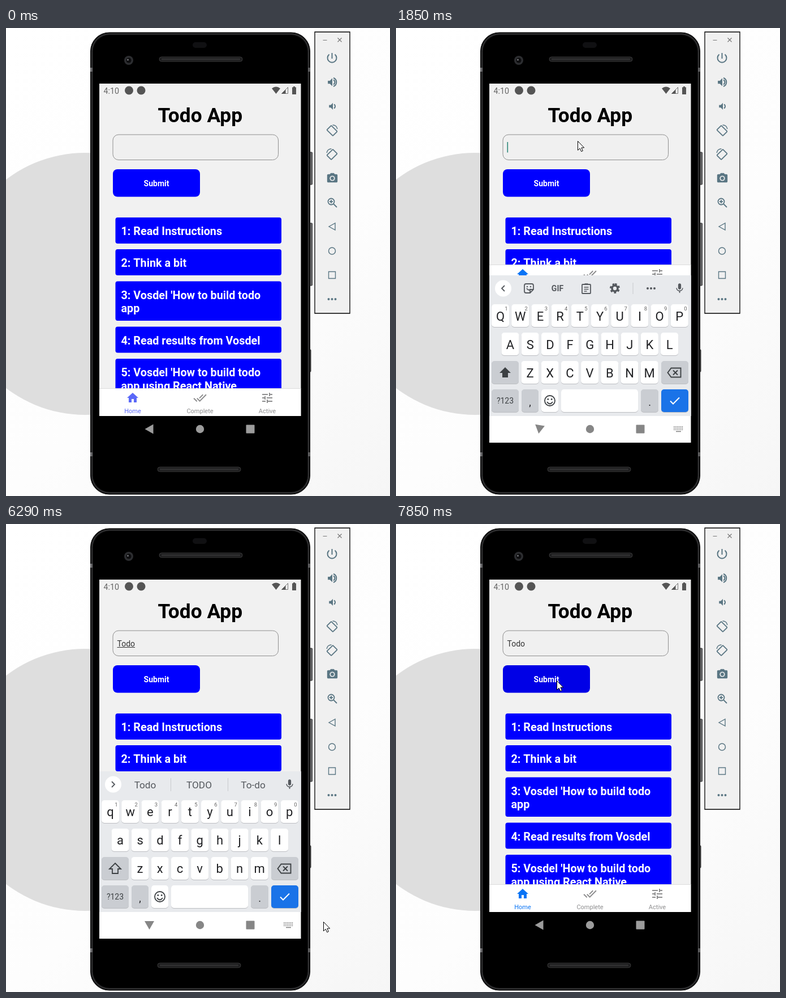
Recreate the animation shown at these times as an HTML page with a canvas. Size 679 by 825 pixels, loop 8 s.

```html
<!DOCTYPE html>
<html lang="en">
<head>
<meta charset="utf-8">
<title>Todo App</title>
<style>
html, body { margin: 0; width: 100%; height: 100%; overflow: hidden; background: #fdfdfd; }
canvas { display: block; }
</style>
</head>
<body>
<canvas id="c" width="679" height="825"></canvas>
<script>
const stage = document.getElementById('c').getContext('2d');
const layer = new OffscreenCanvas(679, 825).getContext('2d');
let g = stage;
const LOOP = 8000, BLUE = '#0000ff', GREY = '#8e8e8f', SLATE = '#5a7683', KEYTXT = '#202124', ICON = '#55595e';

const clamp = v => Math.max(0, Math.min(1, v));

function rect(x, y, w, h, r, fill, stroke, lw = 1) {
  g.beginPath();
  g.roundRect(x, y, w, h, r);
  if (fill) { g.fillStyle = fill; g.fill(); }
  if (stroke) { g.strokeStyle = stroke; g.lineWidth = lw; g.stroke(); }
}
function circle(x, y, r, fill, stroke, lw = 1) {
  rect(x - r, y - r, 2 * r, 2 * r, r, fill, stroke, lw);
}
function text(s, x, y, size, color, align = 'left', weight = 400) {
  g.font = `${weight} ${size}px Roboto, sans-serif`;
  g.textAlign = align;
  g.fillStyle = color;
  g.fillText(s, x, y);
}
// Filled 24-unit icon centred at x, y
function icon(d, x, y, size, color) {
  g.save();
  g.translate(x, y);
  g.scale(size / 24, size / 24);
  g.translate(-12, -12);
  g.fillStyle = color;
  g.fill(new Path2D(d));
  g.restore();
}
// Stroked path relative to x, y
function lines(d, x, y, color, lw = 1.5) {
  g.save();
  g.translate(x, y);
  g.strokeStyle = color;
  g.lineWidth = lw;
  g.stroke(new Path2D(d));
  g.restore();
}
function clipped(x, y, w, h, draw) {
  g.save();
  g.beginPath();
  g.rect(x, y, w, h);
  g.clip();
  draw();
  g.restore();
}

const HOME = 'M10 20v-6h4v6h5v-8h3L12 3 2 12h3v8z';
const DONE = 'M18 7l-1.41-1.41-6.34 6.34 1.41 1.41zM22.24 5.59L11.66 16.17 7.48 12l-1.41 1.41L11.66 19l12-12zM.41 13.41L6 19l1.41-1.41L1.83 12z';
const TUNE = 'M3 17v2h6v-2zM3 5v2h10V5zM13 21v-2h8v-2h-8v-2h-2v6zM7 9v2H3v2h4v2h2V9zM21 13v-2H11v2zM15 9h2V7h4V5h-4V3h-2z';
const SPEAKER = 'M3 9v6h4l5 5V4L7 9z';
const MIC = 'M12 14c1.66 0 3-1.34 3-3V5c0-1.66-1.34-3-3-3S9 3.34 9 5v6c0 1.66 1.34 3 3 3zM17.3 11c0 3-2.54 5.1-5.3 5.1S6.7 14 6.7 11H5c0 3.41 2.72 6.23 6 6.72V21h2v-3.28c3.28-.48 6-3.3 6-6.72z';
const CAMERA = 'M9 2L7.17 4H4c-1.1 0-2 .9-2 2v12c0 1.1.9 2 2 2h16c1.1 0 2-.9 2-2V6c0-1.1-.9-2-2-2h-3.17L15 2z';

function dots(x, y, color) {
  for (const d of [-6, 0, 6]) circle(x + d, y, 2, color);
}

function backdrop() {
  const bg = g.createLinearGradient(0, 0, 679, 825);
  bg.addColorStop(0, '#ffffff');
  bg.addColorStop(.6, '#fdfdfd');
  bg.addColorStop(1, '#f6f6f6');
  g.fillStyle = bg;
  g.fillRect(0, 0, 679, 825);
  circle(140, 451, 231, '#dedede');
}

function phone() {
  for (const [y, h] of [[219, 57], [344, 110], [567, 39]]) rect(536, y, y < 500 ? 5.5 : 3, h, 1, '#6a6a6c', '#2a2a2b');
  rect(149.5, 8, 388, 814, 33, '#141415', '#050505');
  rect(152, 10.5, 383, 809, 31, null, '#48484a');
  rect(154, 12.5, 379, 805, 29, '#000');
  g.fillStyle = '#6a6a6c';
  for (const y of [70, 748]) { g.fillRect(149, y, 4, 7); g.fillRect(534.5, y, 3, 7); }
  rect(330, 25, 25, 10, 5, '#101012');
  circle(217, 57, 8, '#2c2d30');
  circle(217, 57, 4.5, '#0c0c0e');
  circle(215.5, 56, 1.5, '#77787c');
  for (const [x, y] of [[271, 51], [268, 774]]) {
    rect(x, y, 147, 8, 4, '#1b1b1c', '#3a3a3b');
    lines('M4 0H143', x, y + 4, '#303031', 3);
  }
}

function panel() {
  rect(546, 7, 62, 496, 0, '#f0f0f0', '#000', 1.3);
  lines('M-3.5 0H3.5', 564, 21.5, '#777', 1);
  lines('M-3.5-3.5L3.5 3.5M3.5-3.5L-3.5 3.5', 590, 21, '#777', 1.2);
  const x = 577;
  lines('M0-9V1M-5-6.5A8 8 0 1 0 5-6.5', x - .5, 53, SLATE, 2);
  icon(SPEAKER, x, 95.5, 21, SLATE);
  lines('M2-4A4.5 4.5 0 0 1 2 4M2-7.5A8 8 0 0 1 2 7.5', x, 95.5, SLATE, 2);
  icon(SPEAKER, x + 1, 138, 18, SLATE);
  lines('M3-3.5A4 4 0 0 1 3 3.5', x, 138, SLATE, 2);
  for (const [y, s] of [[181, 1], [223, -1]]) {
    g.save();
    g.translate(x - .5, y);
    g.scale(s, 1);
    lines('M1-10Q8-10 9.5-3', 0, 0, SLATE, 1.4);
    g.rotate(-Math.PI / 4);
    rect(-5.5, -7.5, 11, 15, 1, null, SLATE, 1.8);
    g.restore();
  }
  icon(CAMERA, x, 265, 22, SLATE);
  circle(x, 265, 4.6, '#f0f0f0');
  circle(x, 265, 2.9, SLATE);
  circle(x - 2, 306, 5.5, null, SLATE, 1.8);
  lines('M2 2L8 8M-5-2H1M-2-5V1', x, 308, SLATE, 1.8);
  lines('M-6 0L5-6V6Z', x, 350, SLATE, 1.4);
  circle(x - .5, 393, 6, null, SLATE, 1.5);
  rect(x - 6.5, 429.5, 12, 12, 0, null, SLATE, 1.4);
  dots(x - .5, 478, SLATE);
}

function statusBar() {
  text('4:10', 172.5, 115.5, 14.3, '#666');
  circle(217.5, 110, 7.5, '#555');
  circle(239, 110, 7.5, '#555');
  g.fillStyle = '#555';
  g.fill(new Path2D('M470 106.5Q477.5 100.5 485 106.5L477.5 116ZM506 104.5h2v-1.5h3v1.5h2V117h-7z'));
  lines('M487.5 115.5H498.5V104.5Z', 0, 0, '#777', 1);
  g.fill(new Path2D('M487 116L494.5 108.5V116Z'));
}

const ITEMS = [
  [334, 46, '1: Read Instructions'],
  [390, 46, '2: Think a bit'],
  [446.5, 69.5, "3: Vosdel 'How to build todo", 'app'],
  [526.5, 46, '4: Read results from Vosdel'],
  [583, 70, "5: Vosdel 'How to build todo", 'app using React Native']
];

function tabs(y, homeColor) {
  g.fillStyle = '#fff';
  g.fillRect(165, y, 356.5, 49);
  g.fillStyle = '#dcdcdc';
  g.fillRect(165, y, 356.5, 1);
  [[HOME, 'Home'], [DONE, 'Complete'], [TUNE, 'Active']].forEach(([d, label], i) => {
    const color = i ? GREY : homeColor, x = 224 + 119 * i;
    icon(d, x, y + 17, 24, color);
    text(label, x, y + 44, 11, color, 'center');
  });
}

// Typed text by time: [time, text, underlined letters]
const TYPING = [
  [0, '', 0], [2550, 't', 0], [2780, 'to', 1], [2930, 'tod', 2], [3160, 'todo', 3], [3330, 'todo', 4],
  [3720, 'tod', 3], [3870, 'to', 2], [4030, 't', 1], [4100, '', 0],
  [4640, 'T', 0], [4810, 'To', 1], [4880, 'Tod', 2], [5130, 'Todo', 3], [5360, 'Todo', 4], [7070, 'Todo', 0]
];
const HINTS = [
  [0, null], [2780, 't to the'], [2930, 'to today tomorrow'], [3160, 'tod today toddler'], [3330, 'todo Todo to-do'],
  [3720, 'tod today toddler'], [3870, 'to today tomorrow'], [4030, 't to the'], [4180, null],
  [4810, 'T The To'], [4880, 'To Today Tomorrow'], [5130, 'Tod Today Toddler'], [5360, 'Todo TODO To-do'], [7070, '']
];
const CARET = [[0, 0], [1380, 1], [2000, 0], [2550, 1], [3570, 0], [3720, 1], [5830, 0], [6360, 1], [6840, 0]];
const at = (list, t) => list.findLast(k => k[0] <= t);

function field(t) {
  rect(189, 188, 292.5, 44.5, 10, '#f0f0f0', '#8f8f8f');
  const [, word, under] = at(TYPING, t);
  text(word, 196.5, 215.5, 14, '#333');
  g.fillStyle = '#333';
  if (under) g.fillRect(196.5, 217, g.measureText(word.slice(0, under)).width, 1);
  if (at(CARET, t)[1]) {
    const x = 196.5 + g.measureText(word).width;
    g.fillStyle = '#2a8578';
    g.fillRect(x, 201, 1.6, 18.5);
  }
}

function app(t) {
  const small = t >= 1850 && t < 7400;
  const tabY = !small ? 635 : t < 1925 ? 417 : 436;
  g.fillStyle = '#f1f1f1';
  g.fillRect(165, 98, 356.5, 586);
  statusBar();
  text('Todo App', 343.3, 166, 35.3, '#000', 'center', 700);
  field(t);
  const press = clamp((t - 7100) / 500);
  rect(189, 249, 154, 48.5, 8, `rgb(0 0 ${255 - 25 * press})`);
  text('Submit', 266, 279, 14, '#fff', 'center', 700);
  clipped(165, 320, 356.5, tabY - 320, () => {
    for (const [y, h, ...rows] of ITEMS) {
      rect(193.5, y, 293.5, h, 4, BLUE);
      rows.forEach((row, i) => text(row, 203.5, y + 31 + 23.5 * i, 19.8, '#fff', 'left', 700));
    }
  });
  if (small) {
    g.fillStyle = '#fff';
    g.fillRect(165, 436, 356.5, 248);
  }
  if (!small || tabY < 436) clipped(165, tabY, 356.5, small ? 19 : 49, () => tabs(tabY, t < 1700 ? '#5a68f8' : '#0a74f5'));
}

function key(x, y, w, fill = '#fff') {
  rect(x, y + 1, w, 40, 5, '#bcbec2');
  rect(x, y, w, 40, 5, fill);
}

function toolbar(hint) {
  const y = 459;
  circle(189.5, y, 14.5, '#fff');
  lines(hint === null ? 'M2.5-5L-2.5 0L2.5 5' : 'M-2.5-5L2.5 0L-2.5 5', 189.5, y, ICON, 1.8);
  icon(MIC, 501.5, y, 21, ICON);
  if (hint) {
    hint.split(' ').forEach((s, i) => text(s, 246 + 95.5 * i, 466, 17.2, ICON, 'center'));
    g.fillStyle = '#c8cacd';
    g.fillRect(291, 448, 1, 23);
    g.fillRect(392, 448, 1, 23);
  }
  if (hint !== null) return;
  lines('M-5-8H5Q8-8 8-5V2L2 8H-5Q-8 8-8 5V-5Q-8-8-5-8ZM8 2H2V8M-4 0Q0 5 3 1', 235, y, ICON, 1.8);
  circle(232, 456, 1.2, ICON);
  circle(238, 456, 1.2, ICON);
  text('GIF', 285.5, 464, 14, ICON, 'center', 700);
  rect(329, 452, 15, 16, 1, null, ICON, 1.8);
  lines('M-3-8H3M-4-2H4M-4 1.5H4M-4 5H1', 336.5, y, ICON, 1.7);
  g.setLineDash([3.4, 3.2]);
  circle(387, y, 7, null, ICON, 4);
  g.setLineDash([]);
  circle(387, y, 5, null, ICON, 3.6);
  g.fillStyle = '#c8cacd';
  g.fillRect(418.5, 449, 1, 20);
  dots(451, y, ICON);
}

function keyboard(t) {
  const caps = t < 2550 || (t >= 4100 && t < 4640), gray = '#cacdd2';
  g.fillStyle = '#e8eaed';
  g.fillRect(165, 436, 356.5, 248);
  toolbar(at(HINTS, t)[1]);
  ['qwertyuiop', 'asdfghjkl', 'zxcvbnm'].forEach((row, r) => [...row].forEach((ch, i) => {
    const x = [184.5, 202, 237][r] + 35.2 * i, y = 487 + 50 * r;
    key(x - 15.5, y, 31);
    text(caps ? ch.toUpperCase() : ch, x, y + (caps ? 28.5 : 27.5), 22, KEYTXT, 'center');
    if (!r) text((i + 1) % 10, x + 10.5, y + 11, 9.5, '#666', 'center');
  }));
  key(169, 587, 48, gray);
  const arrow = 'M0-10L10 0H5V8H-5V0H-10Z';
  if (caps) icon('M12 2L22 12H17V20H7V12H2Z', 193, 608, 24, '#3c4043');
  else lines(arrow, 193, 608, '#3c4043', 1.8);
  key(469, 587, 48, gray);
  lines('M-12 0L-6-8H11V8H-6ZM-2.5-4L5.5 4M5.5-4L-2.5 4', 492.5, 607.5, '#3c4043', 1.9);
  key(169, 637, 48, gray);
  text('?123', 193, 662, 14, '#3c4043', 'center');
  key(222, 637, 30, gray);
  text(',', 237, 666, 18, KEYTXT, 'center');
  key(257, 637, 30);
  circle(272, 657, 9, null, '#3c4043', 1.8);
  circle(268.8, 654.5, 1.4, '#3c4043');
  circle(275.2, 654.5, 1.4, '#3c4043');
  lines('M-5 2Q0 9 5 2', 272, 657, '#3c4043', 1.8);
  key(292, 637, 136);
  key(433, 637, 31, gray);
  text('.', 448.5, 666, 18, KEYTXT, 'center');
  key(469, 637, 48, '#1a73e8');
  lines('M-8 0L-3 5L8-6', 493, 657.5, '#fff', 2);
}

function navBar(t, show) {
  g.fillStyle = '#000';
  g.fillRect(165, 684, 356.5, 47);
  g.globalAlpha = show;
  g.fillStyle = '#fff';
  g.fillRect(165, 684, 356.5, 47);
  g.globalAlpha = 1;
  const color = show > .5 ? '#868686' : '#9c9c9c';
  const turn = clamp((t - 1620) / 255) - clamp((t - 7400) / 200);
  g.save();
  g.translate(253.5, 707);
  g.rotate(-turn * Math.PI / 2);
  g.fillStyle = color;
  g.fill(new Path2D('M-8 0L7-8.5V8.5Z'));
  g.restore();
  circle(343, 707, 7.2, color);
  rect(424.5, 699.5, 15, 15, 1, color);
  if (t >= 1600 && t < 7150) {
    g.fillStyle = color;
    for (let r = 0; r < 3; r++) for (let i = 0; i < 6; i++) g.fillRect(491 + 2.9 * i, 702 + 2.7 * r, 1.7, 1.5);
    g.fillRect(495, 710.5, 9, 1.6);
  }
}

const POINTER = [
  [70, 625, 736], [220, 545, 560], [380, 415, 330], [530, 333, 215], [600, 321, 199],
  [5560, 321, 199], [5660, 307, 198], [5760, 307, 198], [5980, 500, 450], [6130, 667, 765], [6240, 600, 720], [6360, 506, 674],
  [6500, 506, 674], [6610, 498, 670], [6800, 498, 670], [6990, 492, 658],
  [7420, 492, 658], [7560, 380, 430], [7700, 290, 290], [7770, 284, 276], [LOOP, 284, 276]
];

function pointer(t) {
  if (t < 70) return;
  const i = POINTER.findIndex(k => k[0] > t), [t0, x0, y0] = POINTER[i - 1], [t1, x1, y1] = POINTER[i];
  const p = (t - t0) / (t1 - t0);
  g.save();
  g.translate(Math.round(x0 + (x1 - x0) * p) + .5, Math.round(y0 + (y1 - y0) * p) + .5);
  const shape = new Path2D('M0 0V16L3.7 12.6L6.2 18.2L8.8 17L6.4 11.5H11.2Z');
  g.fillStyle = '#fff';
  g.fill(shape);
  g.strokeStyle = '#000';
  g.lineWidth = 1;
  g.stroke(shape);
  g.restore();
}

// The keyboard fades as one layer so that its keys stay opaque to each other
function fadeKeyboard(t, show) {
  g = layer;
  keyboard(t);
  g = stage;
  clipped(165, 417, 356.5, 271, () => {
    g.globalAlpha = show;
    g.drawImage(layer.canvas, 0, 24 * (1 - show));
  });
}

function draw(now) {
  const t = now % LOOP;
  const show = clamp((t - 1650) / 200) - clamp((t - 7190) / 230);
  backdrop();
  phone();
  panel();
  app(t);
  navBar(t, show);
  if (show > 0) fadeKeyboard(t, show);
  pointer(t);
}

let start;
function tick(now) {
  start ??= now;
  draw(now - start);
  requestAnimationFrame(tick);
}
draw(0);
requestAnimationFrame(tick);
</script>
</body>
</html>
```
